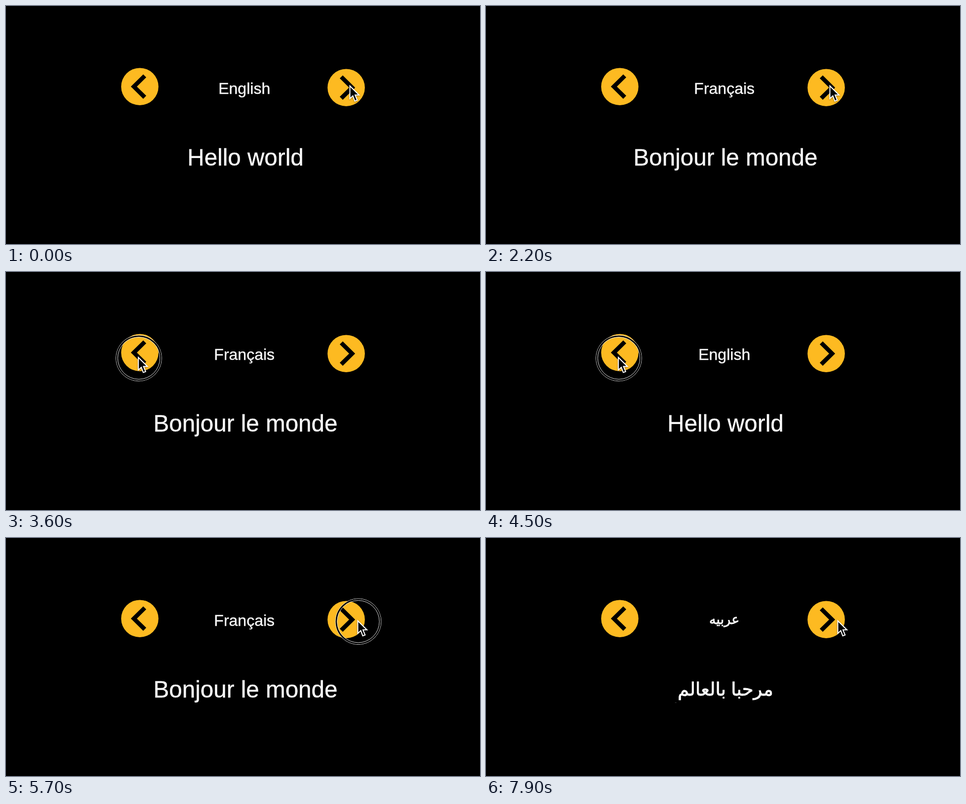
Recreate the animation shown at these times as an HTML page. Size 960 px wide and 482 px high, loop 8000 ms.

```html
<!DOCTYPE html>
<html lang="en">
<head>
<meta charset="utf-8">
<style>
  html, body { margin: 0; width: 960px; height: 482px; overflow: hidden; background: #000; }
  svg { display: block; }
  text {
    fill: #fafafa; stroke: #fafafa; stroke-width: .4; text-anchor: middle;
    font-family: "Liberation Sans", Arial, "DejaVu Sans", sans-serif;
  }
  #label { font-size: 32px; }
  #greeting { font-size: 47.6px; }
  .arabic text { stroke-width: .9; transform: translateY(-4px); }
  .arabic #label { font-size: 27px; }
  .arabic #greeting { font-size: 37px; }
  .button circle { fill: #fdba21; }
  .button path { fill: none; stroke: #000; stroke-width: 8.6; }
  #ring circle { fill: none; stroke: #ddd; }
  #cursor { filter: drop-shadow(0 1px 1.5px rgba(0, 0, 0, .4)); }
</style>
</head>
<body>
<svg id="stage" width="960" height="482">
  <g class="button" transform="translate(271 163.2)">
    <circle r="37.8"/><path d="M10-21.7L-12 0L10 21.7"/>
  </g>
  <g class="button" transform="translate(689 165.2)">
    <circle r="37.8"/><path d="M-10-21.7L12 0L-10 21.7"/>
  </g>
  <text id="label" x="482.7" y="178"></text>
  <text id="greeting" x="485" y="322.5"></text>
  <g id="ring"><circle r="46.4"/><circle r="44.5" style="stroke:#000; stroke-width:2.6"/><circle r="42.7"/></g>
  <path id="cursor" fill="#000" stroke="#fff" stroke-width="2"
    d="M1 2.5V28L7 22.4L11 33L15.8 31.2L11.5 20.8H19.5Z"/>
</svg>
<script>
const LOOP = 8000, STEP = 100, REACTION = 100, RING_TIME = 200;
const languages = [
  ["English", "Hello world"],
  ["Français", "Bonjour le monde"],
  ["Spanish", "Hola Mundo"],
  ["عربيه", "مرحبا بالعالم"]
];
const ARABIC = 3;
const clicks = [
  { at: 700, by: 1 }, { at: 2300, by: 1 },
  { at: 3500, by: -1 }, { at: 4400, by: -1 },
  { at: 5600, by: 1 }, { at: 6300, by: 1 }, { at: 7600, by: 1 }
];
// pointer moves; dip bends the way downwards
const start = { x: 695.5, y: 159.5 };
const moves = [
  { from: 2500, until: 3100, x: 267, y: 187, dip: 48 },
  { from: 3100, until: 3400, x: 267, y: 170.5, dip: 0 },
  { from: 4800, until: 5100, x: 806, y: 115, dip: 0 },
  { from: 5100, until: 5300, x: 717, y: 188, dip: 0 },
  { from: 5300, until: 5500, x: 711.5, y: 165.2, dip: 0 }
];
const $ = id => document.getElementById(id);
const place = (el, x, y) => el.setAttribute("transform", `translate(${x} ${y})`);
const clamp = v => Math.min(1, Math.max(0, v));
const ease = k => k * k * (3 - 2 * k);

function pointerAt(t) {
  let { x, y } = start;
  for (const m of moves) {
    const k = ease(clamp((t - m.from) / (m.until - m.from)));
    x += (m.x - x) * k;
    y += (m.y - y) * k + m.dip * Math.sin(Math.PI * k);
  }
  return { x, y };
}

let shown;
function setLanguage(index) {
  if (index === shown) return;
  shown = index;
  [$("label").textContent, $("greeting").textContent] = languages[index];
  $("stage").classList.toggle("arabic", index === ARABIC);
}

function draw() {
  const t = Math.floor(performance.now() % LOOP / STEP) * STEP;
  const { x, y } = pointerAt(t);
  place($("cursor"), x, y);
  place($("ring"), x + 2, y + 4);
  const pressed = clicks.some(c => t >= c.at && t < c.at + RING_TIME);
  $("ring").style.visibility = pressed ? "visible" : "hidden";
  setLanguage(clicks.reduce((index, c) => index + (t >= c.at + REACTION ? c.by : 0), 0));
  requestAnimationFrame(draw);
}
draw();
</script>
</body>
</html>
```
